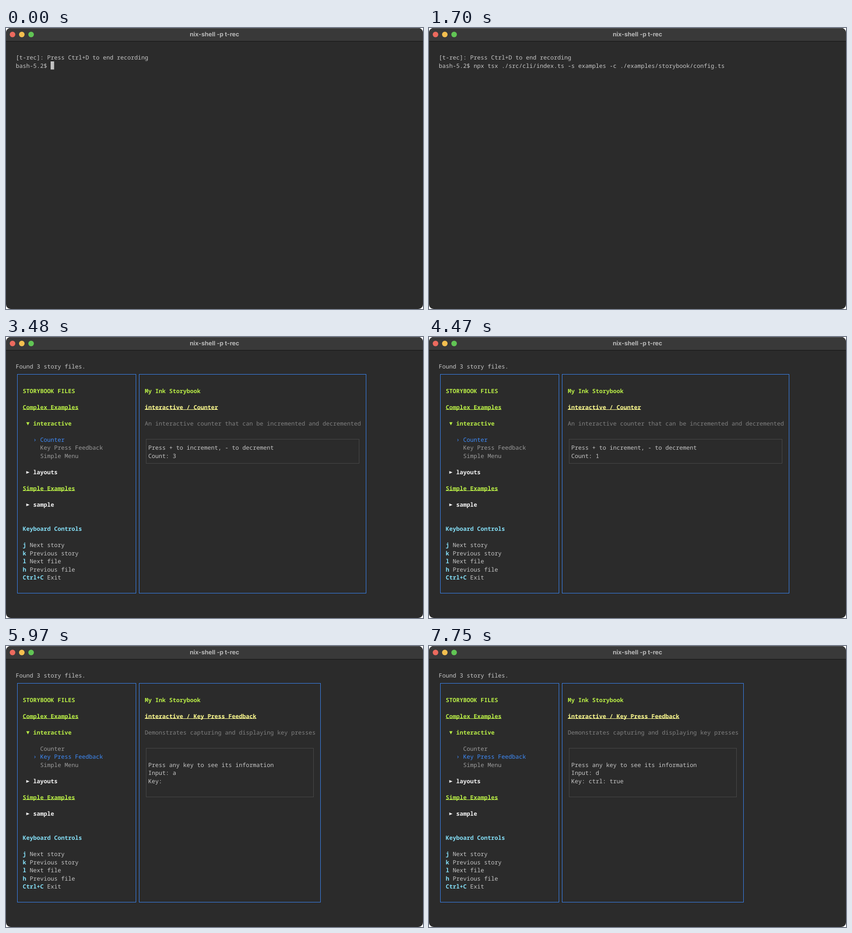
These frames come from a looping animation (897 by 606 pixels, 8 s). An HTML page:

```html
<!DOCTYPE html>
<html lang="en">
<head>
<meta charset="utf-8">
<title>Terminal</title>
<style>
  html, body { margin: 0; width: 100%; height: 100%; overflow: hidden; background: #fff; }
  svg { display: block; width: 897px; height: 606px; }
  text { white-space: pre; text-rendering: geometricPrecision; }
  .term text { font: 12.5px "Noto Sans Mono", "DejaVu Sans Mono", monospace; fill: #c7c7c7; }
  .term .bold { font-weight: 700; }
  .term .green { fill: #b8ec46; }
  .term .yellow { fill: #fffd90; }
  .term .blue { fill: #3f8cfb; }
  .term .cyan { fill: #85e0f8; }
  .term .white { fill: #f2f2f2; }
  .term .item { fill: #9b9b9b; }
  .term .dim { fill: #808080; }
  .title { font: 700 13px Inter, "Open Sans", sans-serif; fill: #b8b8b8; text-anchor: middle; }
  .pane { fill: none; stroke: #3a86f5; }
  .story { fill: none; stroke: #484848; }
</style>
</head>
<body>
<svg viewBox="0 0 897 606">
  <rect width="897" height="606" rx="10" fill="#2b2b2b"/>
  <path d="M0 28V10A10 10 0 0 1 10 0H887A10 10 0 0 1 897 10V28Z" fill="#393939"/>
  <path d="M9 .5H888" stroke="#5c5c5c"/>
  <path d="M0 28.5H897" stroke="#141414"/>
  <circle cx="14" cy="14" r="6" fill="#ec6a5e"/>
  <circle cx="34" cy="14" r="6" fill="#f4bf4f"/>
  <circle cx="54" cy="14" r="6" fill="#61c554"/>
  <text class="title" x="448.5" y="18">nix-shell -p t-rec</text>
  <g class="term" id="term"></g>
</svg>
<script>
  const LOOP = 8000;
  const START = 1990, SWITCH = 4770;
  const term = document.getElementById("term");
  const timed = [];

  const colX = c => 21 + 7.5 * c;
  const baseY = r => 68.4 + 17.5 * r;
  const lineX = c => Math.floor(colX(c) + 3.25) + 0.5;
  const lineY = r => Math.floor(62.9 + 17.5 * r) + 0.5;

  function add(parent, tag, attrs, content = "") {
    const node = document.createElementNS("http://www.w3.org/2000/svg", tag);
    for (const key in attrs) node.setAttribute(key, attrs[key]);
    node.textContent = content;
    return parent.appendChild(node);
  }

  // A group visible while from <= t < to
  function during(from, to, parent = term) {
    const node = add(parent, "g", {});
    timed.push({ node, from, to });
    return node;
  }

  const write = (g, col, row, content, cls = "") =>
    add(g, "text", { x: colX(col), y: baseY(row), class: cls }, content);

  function heading(g, col, row, content, color) {
    write(g, col, row, content, "bold " + color);
    add(g, "rect", {
      x: colX(col), y: Math.floor(baseY(row) + 1),
      width: 7.5 * content.length, height: 1, class: color
    });
  }

  function box(g, c0, r0, c1, r1, cls) {
    const x = lineX(c0), y = lineY(r0);
    add(g, "rect", { x, y, width: lineX(c1) - x, height: lineY(r1) - y, class: cls });
  }

  const cursor = (g, col, row) =>
    add(g, "rect", { x: colX(col), y: 54.5 + 17.5 * row, width: 7.5, height: 17.5, fill: "#c0c0c0" });

  const arrowDown = (g, row) =>
    add(g, "path", { d: `M43.6 ${baseY(row) - 7.2}h7l-3.5 6.8z`, class: "green" });
  const arrowRight = (g, row) =>
    add(g, "path", { d: `M43.6 ${baseY(row) - 7}v6.2l7-3.1z`, class: "white" });

  function item(row, content, from, to) {
    for (const [a, b] of [[START, from], [to, LOOP]])
      if (a < b) write(during(a, b), 7, row, content, "item");
    if (from < to) {
      const g = during(from, to);
      write(g, 5, row, "›", "blue");
      write(g, 7, row, content, "blue");
    }
  }

  // Shell prompt
  const shell = during(0, START);
  write(shell, 0, 0, "[t-rec]: Press Ctrl+D to end recording");
  write(shell, 0, 1, "bash-5.2$ ");
  cursor(during(0, 250), 10, 1);
  write(during(250, START), 10, 1,
    "npx tsx ./src/cli/index.ts -s examples -c ./examples/storybook/config.ts");
  cursor(during(250, 830), 82, 1);
  cursor(during(830, 1410), 0, 2);

  // Sidebar
  const app = during(START, LOOP);
  write(app, 0, 0, "Found 3 story files.");
  box(app, 0, 1, 34, 28, "pane");
  write(app, 2, 3, "STORYBOOK FILES", "bold green");
  heading(app, 2, 5, "Complex Examples", "green");
  arrowDown(app, 7);
  write(app, 5, 7, "interactive", "bold green");
  item(9, "Counter", START, SWITCH);
  item(10, "Key Press Feedback", SWITCH, LOOP);
  item(11, "Simple Menu", LOOP, LOOP);
  arrowRight(app, 13);
  write(app, 5, 13, "layouts", "bold white");
  heading(app, 2, 15, "Simple Examples", "green");
  arrowRight(app, 17);
  write(app, 5, 17, "sample", "bold white");
  write(app, 2, 20, "Keyboard Controls", "bold cyan");
  [["j", "Next story"], ["k", "Previous story"], ["l", "Next file"],
   ["h", "Previous file"], ["Ctrl+C", "Exit"]].forEach(([key, action], i) => {
    write(app, 2, 22 + i, key, "bold cyan");
    write(app, 3 + key.length, 22 + i, action);
  });
  write(app, 37, 3, "My Ink Storybook", "bold green");

  // Preview pane, sized to its description
  function preview(from, to, name, about, lastRow) {
    const g = during(from, to);
    const right = 38 + about.length;
    box(g, 35, 1, right, 28, "pane");
    heading(g, 37, 5, "interactive / " + name, "yellow");
    write(g, 37, 7, about, "dim");
    box(g, 37, 9, right - 2, lastRow, "story");
    return g;
  }

  const counter = preview(START, SWITCH, "Counter",
    "An interactive counter that can be incremented and decremented", 12);
  write(counter, 38, 10, "Press + to increment, - to decrement");
  const count = write(counter, 38, 11, "");

  const keys = preview(SWITCH, LOOP, "Key Press Feedback",
    "Demonstrates capturing and displaying key presses", 15);
  write(keys, 38, 11, "Press any key to see its information");
  const input = write(keys, 38, 12, "");
  const key = write(keys, 38, 13, "");

  const PLUS = [2580, 2880, 3180], MINUS = [3780, 4080];
  const pressed = (times, t) => times.filter(at => t >= at).length;

  function render(t) {
    for (const { node, from, to } of timed)
      node.style.display = t >= from && t < to ? "" : "none";
    count.textContent = "Count: " + (pressed(PLUS, t) - pressed(MINUS, t));
    input.textContent = "Input: " + (t >= 7450 ? "d" : t >= 5670 ? "a" : "");
    key.textContent = "Key:" + (t >= 7450 ? " ctrl: true" : "");
  }

  const began = performance.now();
  function tick() {
    render((performance.now() - began) % LOOP);
    requestAnimationFrame(tick);
  }
  render(0);
  requestAnimationFrame(tick);
</script>
</body>
</html>
```
